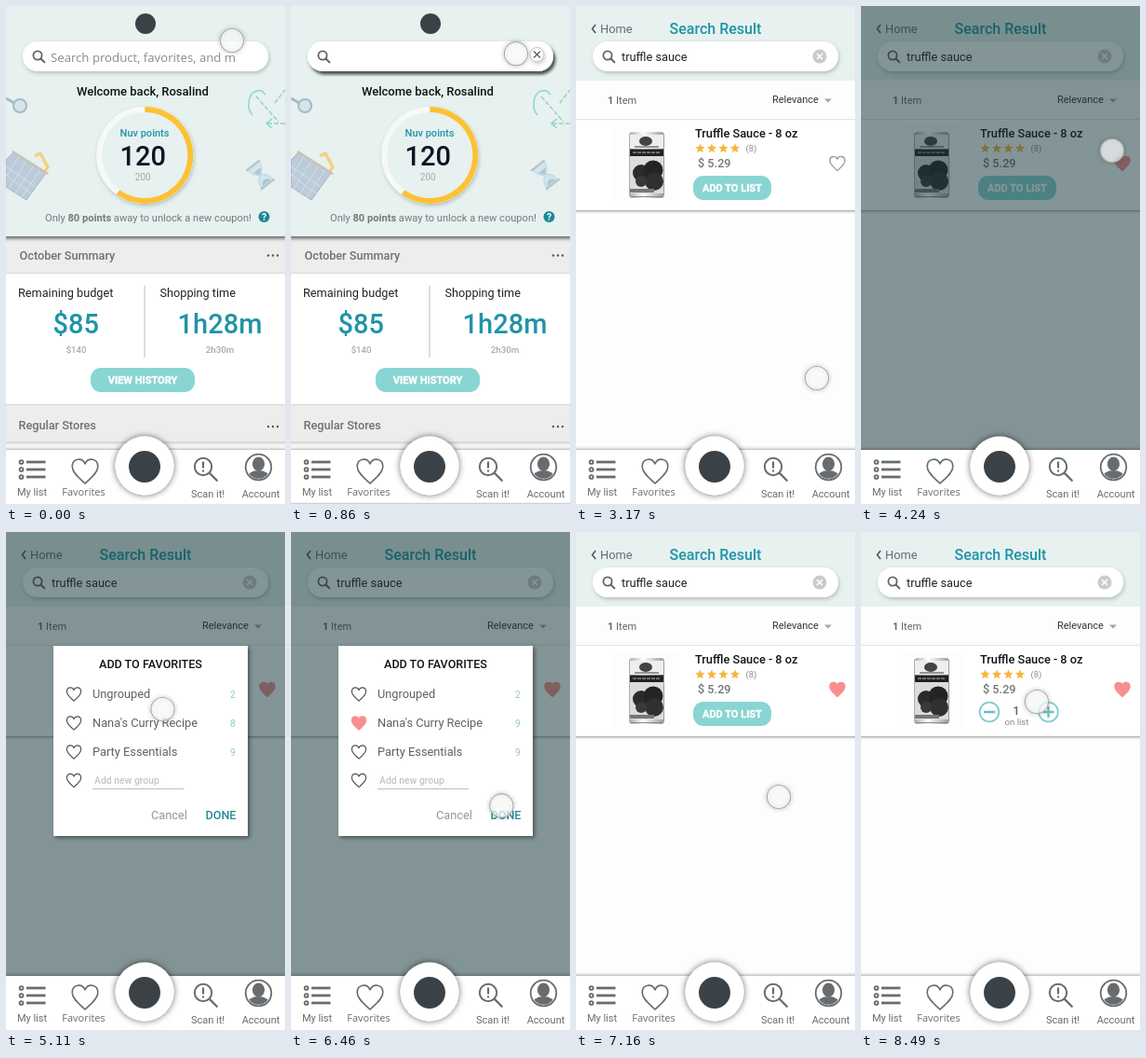
An HTML page that plays this animation: 300 by 534 pixels, repeating every 9.26 s.

```html
<!DOCTYPE html>
<html lang="en">
<head>
<meta charset="utf-8">
<title>Grocery app demo</title>
<style>
  html, body { margin: 0; width: 100%; height: 100%; overflow: hidden; background: #fff; }
  svg { display: block; width: 300px; height: 534px; font-family: Roboto, sans-serif; }
  .keys text { font-family: "Liberation Sans", sans-serif; stroke: currentColor; stroke-width: .4; }
  .wide { font-family: "Open Sans", sans-serif; }
  .heavy { stroke: #fff; stroke-width: .35; }
</style>
</head>
<body>
<svg id="stage" viewBox="0 0 300 534" xmlns="http://www.w3.org/2000/svg"></svg>
<script>
const LOOP = 9260;
const TEAL = '#1f94a6', MINT = '#89d5d3', PALE = '#e6f1f0', INK = '#3b4247', PINK = '#f88f8f';

// ---- drawing helpers ----
const text = (x, y, str, size, fill, weight = 400, anchor = 'start', extra = '') =>
  `<text x="${x}" y="${y}" font-size="${size}" fill="${fill}" font-weight="${weight}" text-anchor="${anchor}" ${extra}>${str}</text>`;
const rect = (x, y, w, h, fill, r = 0, extra = '') =>
  `<rect x="${x}" y="${y}" width="${w}" height="${h}" rx="${r}" fill="${fill}" ${extra}/>`;
const circle = (x, y, r, fill, extra = '') =>
  `<circle cx="${x}" cy="${y}" r="${r}" fill="${fill}" ${extra}/>`;
const line = (d, stroke, width = 1, extra = '') =>
  `<path d="${d}" fill="none" stroke="${stroke}" stroke-width="${width}" ${extra}/>`;
const group = (id, body, extra = '') => `<g id="${id}" ${extra}>${body}</g>`;

const heart = (x, y, w, fill, stroke, sw = 1.3, id = '') => {
  const k = w / 20;
  return `<path ${id && `id="${id}"`} transform="translate(${x} ${y}) scale(${k})" fill="${fill}" stroke="${stroke}" stroke-width="${sw / k}" stroke-linejoin="round"
    d="M0 9C-4 5-9.5 1-9.5-3.5C-9.5-10-2-10.5 0-5.5C2-10.5 9.5-10 9.5-3.5C9.5 1 4 5 0 9Z"/>`;
};
const star = (x, y, r) => {
  const pts = Array.from({ length: 10 }, (_, i) => {
    const a = Math.PI * i / 5, q = i % 2 ? r * .45 : r;
    return (x + q * Math.sin(a)).toFixed(2) + ',' + (y - q * Math.cos(a)).toFixed(2);
  });
  return `<polygon points="${pts.join(' ')}" fill="#f6b53c"/>`;
};
const lens = (x, y, r, color, sw) =>
  circle(x, y, r, 'none', `stroke="${color}" stroke-width="${sw}"`) +
  line(`M${x + r * .75} ${y + r * .75}l${r * .85} ${r * .85}`, color, sw * 1.15, 'stroke-linecap="round"');
const dots = y => [282, 287, 292].map(x => circle(x, y, 1.2, '#555')).join('');
const button = (x, y, w, label) =>
  rect(x, y, w, 26, MINT, 11) + text(x + w / 2, y + 17, label, 11, '#fff', 700, 'middle', 'class="heavy"');
const searchBar = id =>
  rect(18, 38, 264, 32, '#fff', 16, 'filter="url(#soft)"') +
  (id ? rect(18, 38, 264, 32, '#fff', 16, `id="${id}" filter="url(#deep)"`) : '') +
  lens(34, 53, 4.6, '#5d6468', 1.8);

// ---- screens ----
const defs = () => {
  const shadow = (id, dx, dy, blur, a) =>
    `<filter id="${id}" x="-20%" y="-40%" width="140%" height="190%"><feDropShadow dx="${dx}" dy="${dy}" stdDeviation="${blur}" flood-color="#000" flood-opacity="${a}"/></filter>`;
  return `<defs>${shadow('soft', 1, 2, 2, .22)}${shadow('deep', 2.5, 3.5, 1.8, .6)}${shadow('edge', 0, 1, 1.5, .55)}
    ${shadow('drop', 0, 2, 2, .65)}${shadow('glow', 0, 0, 2, .5)}${shadow('halo-glow', 0, 0, 3.5, .6)}${shadow('card', 2, 2, 2, .45)}
    <linearGradient id="tin"><stop offset="0" stop-color="#aaa"/><stop offset=".4" stop-color="#fff"/><stop offset="1" stop-color="#999"/></linearGradient></defs>`;
};

const doodles = () =>
  line('M0 99L9 104', '#a9b9bd', 3) + circle(15, 107, 7, '#d3e6ef', 'stroke="#a9b9bd" stroke-width="2"') +
  line('M31 161L37 158L45 173L41 178', '#f3d27c', 3.5, 'stroke-linejoin="round"') +
  '<path d="M8 157L43 179L22 208L0 194V165Z" fill="#bccbd9" stroke="#a8b5c0"/>' +
  line('M0 172L32 194M0 181L27 201M14 161L1 182M22 166L3 196M30 171L10 201M37 175L17 205', '#d5dfe6') +
  line('M7 156L45 180', '#c9c3b4', 2.5) +
  line('M265 117Q260 111 261 103Q263 89 275 91L279 95', '#91d3c9', 1.5) +
  line('M269 97L293 124M289 104L300 90M300 126H281', '#91d3c9', 1.5, 'stroke-dasharray="5 2"') +
  line('M286 121L280 126L286 131', '#91d3c9', 1.5) +
  `<g transform="translate(273.5 181) rotate(-38) scale(.85)">
    <path d="M-9-14H9Q9-5 1 0Q9 5 9 14H-9Q-9 5-1 0Q-9-5-9-14Z" fill="#d3e5ec" stroke="#c2d3d9"/>
    <path d="M-6-7H6L0 0ZM-7 13Q0 3 7 13Z" fill="#a9c8d8"/>` +
  line('M-11-15H11M-11 15H11', '#b8c4c6', 2.6) + '</g>';

const home = () => {
  const cx = 149.3, cy = 160, r = 49, a = 1.2 * Math.PI;
  const end = `${cx + r * Math.sin(a)} ${cy - r * Math.cos(a)}`;
  return rect(0, 0, 300, 534, '#fff') +
    rect(0, 240, 300, 46, '#ededed') + line('M0 286.5H300', '#d9d9d9') +
    rect(-5, -5, 310, 252, PALE, 0, 'filter="url(#drop)"') + doodles() +
    circle(150, 19, 11, INK) + searchBar('focus') +
    text(48, 60, 'Search product, favorites, and m', 13.2, '#8a8a8a', 400, 'start', 'id="hint" class="wide"') +
    text(48, 59, '', 12.8, '#222', 400, 'start', 'id="typed"') +
    group('clear', circle(264.5, 52, 7.5, '#fff', 'stroke="#b5b5b5" stroke-width=".8" filter="url(#soft)"') +
      line('M261 48.5l7 7M268 48.5l-7 7', '#555', 1.2)) +
    text(76, 96, 'Welcome back, Rosalind', 13, '#111', 500) +
    circle(cx, cy, r, PALE, 'stroke="#f7f9f9" stroke-width="6" filter="url(#soft)"') +
    line(`M${cx} ${cy - r}A${r} ${r} 0 1 1 ${end}`, '#fcc134', 6) +
    text(149, 140, 'Nuv points', 11, TEAL, 500, 'middle') +
    text(147.3, 171, '120', 29, '#101524', 500, 'middle') +
    text(147.3, 187, '200', 10, '#a5a9aa', 400, 'middle') +
    text(42, 231, 'Only <tspan font-weight="700">80 points</tspan> away to unlock a new coupon!', 11.1, '#747a7a') +
    circle(277.5, 226, 6, '#1c8794') + text(277.5, 230, '?', 10.5, '#fff', 700, 'middle') +
    text(14.5, 272, 'October Summary', 12.7, '#717171', 500) + dots(267.5) +
    text(13, 312, 'Remaining budget', 12.7, '#222') + text(165.5, 312, 'Shopping time', 12.7, '#222') +
    line('M149 300V377', '#d0d0d0', 1.5) +
    text(75.2, 351, '$85', 29, TEAL, 500, 'middle') + text(75.5, 372, '$140', 9.5, '#aaa', 500, 'middle') +
    text(230, 351, '1h28m', 29, TEAL, 500, 'middle') + text(230, 372, '2h30m', 9.8, '#aaa', 500, 'middle') +
    button(91, 388, 112, 'VIEW HISTORY') +
    rect(-5, 428, 310, 39, '#ededed', 0, 'filter="url(#soft)"') + line('M0 427.5H300', '#d5d5d5') +
    text(13.5, 454, 'Regular Stores', 12.7, '#717171', 500) + dots(451);
};

const tin = () =>
  rect(40, 128, 72, 82, '#fdfdfd') + rect(57, 135, 38, 71, 'url(#tin)', 4) +
  rect(58, 138, 36, 15, '#eee') + `<ellipse cx="75" cy="145" rx="7" ry="5" fill="#444"/>` +
  line('M63 151H89', '#777', 1.5) +
  rect(58, 153.5, 36, 7.5, '#222') + line('M61 157.2H91', '#999', 1.2, 'stroke-dasharray="4 1"') +
  rect(58, 161, 36, 40, '#dcdcdc') +
  circle(70, 179, 9, '#2b2b2d') + circle(83, 176, 10.5, '#242426') + circle(84, 188, 10, '#303032') +
  circle(70, 188, 6, '#39393b') + rect(58, 196, 26, 4, '#777') + line('M58 204.5H94', '#888');

const results = () =>
  rect(0, 0, 300, 534, '#fdfdfd') + rect(0, 0, 300, 80, PALE) +
  line('M21 20L17.5 24.5L21 29', '#555', 1.6) + text(26, 29, 'Home', 12.8, '#686d70') +
  text(150, 30, 'Search Result', 16, TEAL, 500, 'middle') +
  searchBar() + text(49, 59, 'truffle sauce', 12.8, '#222') +
  circle(262, 54, 7.5, '#c9cccd') + line('M259 51l6 6M265 51l-6 6', '#fff', 1.6) +
  text(34, 105, '<tspan font-weight="700">1</tspan> Item', 11, '#666') +
  text(211, 104, 'Relevance', 11, '#333') + '<path d="M267 99.5H275L271 103.5Z" fill="#a5a5a5"/>' +
  rect(-5, 121, 310, 98, '#fff', 0, 'filter="url(#edge)" opacity=".8"') +
  rect(0, 120, 300, 98.5, '#fff') + line('M0 121.5H300', '#e2e2e2') + tin() +
  text(128, 141, 'Truffle Sauce - 8 oz', 12.8, '#151515', 500) +
  [133.5, 146, 158.5, 171].map(x => star(x, 152.8, 5.4)).join('') +
  text(182.5, 156, '(8)', 9.5, '#8b8b8b') + text(131, 173, '$ 5.29', 12.7, '#777', 500) +
  heart(281, 169, 17, 'none', '#999', 1.3, 'fav') +
  group('add', button(126, 182, 84, 'ADD TO LIST')) +
  group('count', [138, 201.5].map(x => circle(x, 193, 10.3, '#fff', 'stroke="#80cbd0" stroke-width="1.8"')).join('') +
    line('M132 193H144M195.5 193H207.5M201.5 187V199', '#69bfc6', 2.4) +
    text(167, 196, '1', 13, '#666', 500, 'middle') + text(167.5, 207, 'on list', 9.6, '#888', 400, 'middle'));

const modal = () => {
  const rows = [['Ungrouped', 2, 174], ["Nana's Curry Recipe", 8, 205], ['Party Essentials', 9, 236]];
  return rect(51, 122, 209, 204, '#fff', 0, 'filter="url(#card)"') +
    text(155.5, 146, 'ADD TO FAVORITES', 12.6, '#151515', 500, 'middle') +
    rows.map(([name, n, y], i) => heart(73, y, 16, 'none', '#555', 1.2, 'pick' + i) +
      text(93, y + 4, name, 12.8, '#5d6163') +
      text(246.5, y + 4, n, 10, '#8fc6cc', 400, 'end', `id="num${i}"`)).join('') +
    heart(73, 266.5, 16, 'none', '#555', 1.2) + text(95, 270, 'Add new group', 10.4, '#c2c6c7', 500) +
    line('M93 275.5H191', '#bbb') +
    text(156, 308, 'Cancel', 12.8, '#8b9b9f') + text(214.5, 308, 'DONE', 12.6, '#258b99', 500);
};

const nav = () => {
  const g = '#696c6f';
  return rect(-5, 476, 310, 65, '#fff', 0, 'filter="url(#glow)"') +
    circle(149, 493, 31.5, '#fff', 'filter="url(#halo-glow)"') +
    circle(149, 494, 17, INK) +
    [489, 497, 505].map(y => circle(16.5, y, 1.9, '#fff', `stroke="${g}" stroke-width="1.9"`) + line(`M22 ${y}H42.5`, g, 2.8)).join('') +
    heart(85, 499, 29, 'none', g, 1.6) + lens(212, 494, 9.2, g, 2) +
    line('M212 488.5V495.5M212 497.5V499.5', g, 2.2) +
    `<clipPath id="face"><circle cx="271.5" cy="494.5" r="12.3"/></clipPath>` +
    circle(271.5, 494.5, 13.8, '#fff', `stroke="${g}" stroke-width="1.8"`) +
    `<g clip-path="url(#face)" fill="${g}"><ellipse cx="271.5" cy="491" rx="6.6" ry="7.4"/><ellipse cx="271.5" cy="506.5" rx="12.5" ry="8.5"/></g>` +
    text(28, 525, 'My list', 11, g, 400, 'middle') + text(83.5, 525, 'Favorites', 11, g, 400, 'middle', 'class="wide"') +
    text(217, 527, 'Scan it!', 11, g, 400, 'middle') + text(274, 527, 'Account', 11, g, 400, 'middle');
};

const keyboard = () => {
  const gray = '#abb1bb';
  const key = (x, y, w, label, fill = '#fff', size = 19.5, color = '#222', id = '') =>
    rect(x, y + 1.3, w, 35.5, '#9a9fa7', 4) + rect(x, y, w, 35.5, fill, 4, id) +
    text(x + w / 2, y + 17.5 + size * .36, label, size, color, 400, 'middle', `color="${color}"`);
  const row = (letters, x, y) => [...letters].map((c, i) => key(x + i * 30, y, 24.5, c)).join('');
  return rect(0, 332, 300, 204, '#cdd1d8') +
    '<g class="keys">' +
    row('QWERTYUIOP', 3, 343) + row('ASDFGHJKL', 18, 394) + row('ZXCVBNM', 48, 444) +
    key(3, 444, 34, '', gray) + key(263, 444, 34, '', gray) +
    key(3, 495, 32, '123', gray, 15) + key(40, 495, 32, '', gray) + key(77, 495, 70, 'space', '#fff', 15) +
    key(153, 495, 31, '@', '#fff', 16.5) + key(190, 495, 32, '.', '#fff', 16) +
    key(228, 495, 69, 'return', gray, 15, '#3f575d', 'id="enter"') + '</g>' +
    '<path d="M20 454L29 463H24V470H16V463H11Z" fill="#fff"/>' +
    '<path d="M270 462L276 455.5H290V468.5H276Z" fill="#fff"/>' + line('M279.5 459l6 6M285.5 459l-6 6', gray, 1.5) +
    rect(53.5, 503.5, 5, 11, 'none', 2.5, 'stroke="#333" stroke-width="1.3"') +
    line('M50.5 510V512Q51 517.5 56 517.5Q61 517.5 61.5 512V510M56 517.5V522M52.5 522H59.5', '#333', 1.2);
};

const pointer = () =>
  circle(0, 0, 19, '#777', 'id="halo" opacity=".22"') +
  circle(0, 0, 12.5, 'none', 'stroke="#a6a9aa" stroke-width="1.2" filter="url(#glow)"') +
  circle(0, 0, 12, '#f5f6f6', 'fill-opacity=".72"');

const stage = document.getElementById('stage');
stage.innerHTML = defs() + group('home', home()) + group('results', results()) +
  group('dim', rect(0, 0, 300, 534, '#143438', 0, 'opacity=".52"')) + group('modal', modal()) +
  group('nav', nav()) + group('keys', keyboard()) + group('pointer', pointer());

// ---- timeline ----
const $ = id => document.getElementById(id);
const set = (id, attr, v) => $(id).setAttribute(attr, v);
const show = (id, on) => set(id, 'display', on ? 'inline' : 'none');
const ramp = (t, a, b) => Math.min(1, Math.max(0, (t - a) / (b - a)));
const between = (t, a, b) => t >= a && t < b;
const smooth = p => p * p * (3 - 2 * p);
const expo = p => p <= 0 ? 0 : p >= 1 ? 1 : p < .5 ? 2 ** (20 * p - 11) : 1 - 2 ** (9 - 20 * p);

// start, end, x, y, easing, bend of the path in y
const moves = [
  [0, 200, 242, 45, smooth, 0],
  [830, 1230, 240, 430, smooth, 0],
  [1500, 1670, 241, 459, smooth, 0],
  [2670, 2830, 262, 510, smooth, 0],
  [2900, 3170, 259, 399, smooth, 0],
  [3340, 4040, 270, 155, expo, 0],
  [4670, 5550, 67, 193, expo, 32],
  [6030, 6650, 232, 297, expo, 0],
  [6890, 7160, 218, 284, smooth, 0],
  [7530, 8230, 189, 182, expo, 0]
];

function pointerAt(t) {
  let x = 243, y = 37;
  for (const [a, b, tx, ty, ease, bend] of moves) {
    if (t < a) break;
    const p = ease(ramp(t, a, b));
    x += (tx - x) * p;
    y += (ty - y) * p + bend * 2 * p * (1 - p);
  }
  return `translate(${x.toFixed(2)} ${y.toFixed(2)})`;
}

function draw(t) {
  const focused = t >= 530, page = smooth(ramp(t, 2870, 3170));
  const typing = 'truffle sauce', steps = Math.floor(ramp(t, 1470, 1670) * 6);
  show('hint', !focused);
  show('focus', focused);
  show('clear', focused);
  $('typed').textContent = typing.slice(0, Math.round(typing.length * steps / 6));
  set('enter', 'fill', t >= 1500 ? '#9dc1c7' : '#abb1bb');
  set('keys', 'transform', `translate(0 ${(204 * (1 - smooth(ramp(t, 830, 1230)))).toFixed(2)})`);
  set('keys', 'opacity', 1 - page);
  show('keys', between(t, 830, 3170));
  show('home', t < 3170);
  show('results', page > 0);
  set('results', 'opacity', page);

  const leave = 1 - smooth(ramp(t, 6890, 7160));
  show('dim', between(t, 4240, 7160));
  set('dim', 'opacity', leave);
  show('modal', between(t, 4240, 7160));
  set('modal', 'opacity', smooth(ramp(t, 4260, 4640)) * leave);
  const liked = t >= 4240, picked = t >= 5690;
  set('fav', 'fill', liked ? PINK : 'none');
  set('fav', 'stroke', liked ? PINK : '#999');
  set('pick1', 'fill', picked ? PINK : 'none');
  set('pick1', 'stroke', picked ? PINK : '#555');
  $('num1').textContent = picked ? 9 : 8;
  show('add', t < 8490);
  show('count', t >= 8490);

  set('pointer', 'transform', pointerAt(t));
  show('halo', between(t, 530, 830) || between(t, 5690, 6030));
}

let start = null;
function tick(now) {
  if (start === null) start = now;
  draw((now - start) % LOOP);
  requestAnimationFrame(tick);
}
draw(0);
requestAnimationFrame(tick);
</script>
</body>
</html>
```
